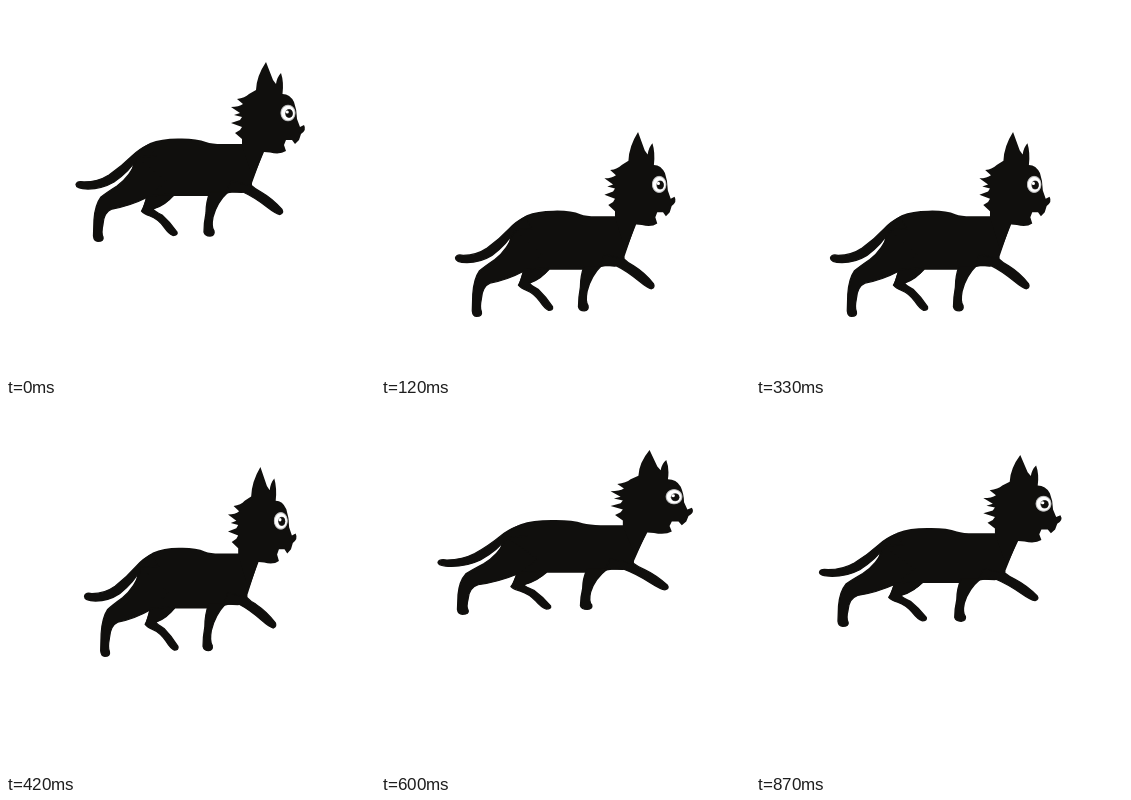
These frames come from a looping animation (369x369 px, 900 ms). An HTML page:

```html
<!DOCTYPE html>
<html lang="en">
<head>
<meta charset="utf-8">
<title>Bouncing cat</title>
<style>
html, body { margin: 0; width: 100%; height: 100%; overflow: hidden; background: #fff; }
svg { display: block; width: 100vw; height: 100vh; }
</style>
</head>
<body>
<svg viewBox="0 0 369 369">
  <defs>
    <radialGradient id="glow">
      <stop offset="0.76" stop-color="#fff"/>
      <stop offset="0.9" stop-color="#aaa"/>
      <stop offset="1" stop-color="#100f0d"/>
    </radialGradient>
  </defs>
  <g id="cat" fill="#100f0d">
    <!-- torso -->
    <path d="M128 150Q134 142 144 137Q155 132.500 172 132.500Q190 132 200 136Q206 138 216 138L239 138L258 144L246 177L246 184L236 187Q215 185 204 190L168 190Q160 198 148 203L136 204L140 192Q124 199 108 190Q126 176 128 150Z"/>
    <g stroke="#100f0d" stroke-width="1.300" stroke-linejoin="round">
      <!-- tail -->
      <path d="M132 151Q124 165 108 176Q96 183 82 183Q70 183 70 178.500Q71 174.500 78 176Q92 176 103 169Q116 160 126 150Q133 143 142 139L150 150Z"/>
      <!-- hind legs -->
      <path d="M132 152Q124 171 111 180Q100 187 95 191Q89 199 88 214L87.500 230Q88 235.300 92 235.300Q98 235.300 97 231Q95 227 97 218Q98 206 106 203Q124 200 142 191L160 175Z"/>
      <path d="M141 190Q139 200 135.500 205Q138 208 144 210Q152 213 158 221Q163 228 167 229.500Q172 229.500 171 226Q164 216 156 209Q148 205 147 203Q160 199 168 188Z"/>
      <!-- front legs -->
      <path d="M204 186Q200 196 200 207Q198 217 198 226Q199 230 204 230Q209 229.500 208 225Q205 221 207 211Q211 196 222 186Z"/>
      <path d="M220 187Q229 185 237 186Q248 191 261 201Q270 208 274 208.500Q278 207 276 203.500Q267 193 255 186Q249 183 246 180L225 175Z"/>
    </g>
    <!-- head -->
    <path d="M250 84Q250.500 70 260 56L267 74L270 78Q271 71 275 67Q278 76 276.500 88Q284 88 288 96Q291 104 291 113L294 121L298 119Q301 124 295 128L293 134L289 138L286 134L280 134L278 139L280 145Q274 149 264 146.500L258 146L247 172L236 139L236 133L229 127L234 124L236 121L225 117L234 114L236 111L228 109L234 107L225 101Q233 101 237 98L231 93Q239 92 243 88Z"/>
    <!-- eye -->
    <ellipse cx="282" cy="107" rx="8" ry="8.800" fill="url(#glow)"/>
    <ellipse cx="283" cy="107.500" rx="3.900" ry="4.400" fill="#555"/>
    <ellipse cx="283.200" cy="107.500" rx="3.400" ry="3.900"/>
    <circle cx="281.200" cy="106" r="1.600" fill="#fff"/>
  </g>
</svg>
<script>
const LOOP = 900, STEP = 30, IMPACT = 225;
const MID = { x: 184.4, y: 146, w: 230, h: 180 };
const cat = document.getElementById("cat");

// Pose by time away from the impact: [ms, centre y, width, height]
const poses = [
  [15, 261, 289, 142],
  [105, 218.5, 221, 185],
  [150, 188, 207, 195],
  [195, 159, 213, 190],
  [225, 146, 230, 180],
  [255, 138, 243, 172],
  [375, 129.5, 256, 165],
  [450, 129.5, 256, 165]
];

const slope = (i, k) =>
  (poses[i + 1][k] - poses[i][k]) / (poses[i + 1][0] - poses[i][0]);

// Tangent that never overshoots its neighbours
function tangent(i, k) {
  if (i === 0 || i === poses.length - 1) return 0;
  const a = slope(i - 1, k), b = slope(i, k);
  return a * b <= 0 ? 0 : 2 * a * b / (a + b);
}

function sample(d, k) {
  let i = 0;
  while (i < poses.length - 2 && d > poses[i + 1][0]) i++;
  const [p, q] = [poses[i], poses[i + 1]];
  const span = q[0] - p[0], u = (d - p[0]) / span, v = 1 - u;
  return p[k] * v * v * (1 + 2 * u) + q[k] * u * u * (3 - 2 * u) +
    span * u * v * (v * tangent(i, k) - u * tangent(i + 1, k));
}

function draw(ms) {
  const t = Math.floor((ms % LOOP) / STEP) * STEP;
  const gap = Math.abs(t - IMPACT);
  const d = Math.min(gap, LOOP - gap);
  const [y, w, h] = [1, 2, 3].map(k => sample(d, k));
  cat.setAttribute("transform",
    `translate(${MID.x} ${y}) scale(${w / MID.w} ${h / MID.h}) translate(${-MID.x} ${-MID.y})`);
}

let start;
function tick(now) {
  start ??= now;
  draw(now - start);
  requestAnimationFrame(tick);
}
draw(0);
requestAnimationFrame(tick);
</script>
</body>
</html>
```
